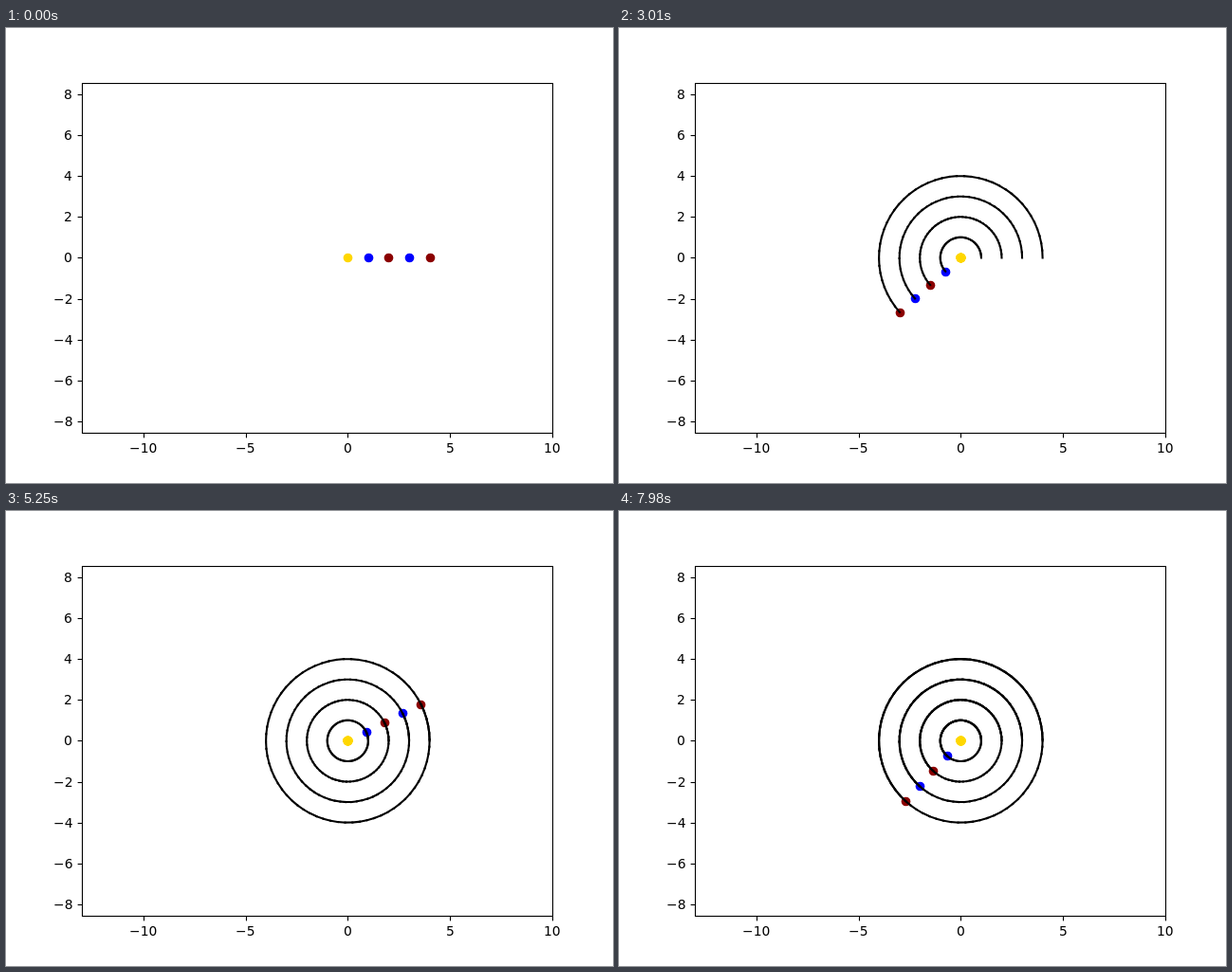
Animation, 640 px wide and 480 px high, one loop 8 s. Source, as an HTML page with a canvas:

```html
<!DOCTYPE html>
<html lang="en">
<head>
<meta charset="utf-8">
<title>Orbits</title>
<style>
html, body { margin: 0; width: 100%; height: 100%; overflow: hidden; background: #fff; }
canvas { display: block; }
</style>
</head>
<body>
<canvas id="stage" width="640" height="480"></canvas>
<script>
const ctx = document.getElementById('stage').getContext('2d');
const LOOP = 8000, STEP_MS = 70, STEP_ANGLE = 0.09;
const UNIT = 496 / 23, CENTER_X = 80 + 13 * UNIT, CENTER_Y = 242.4;
const BODY_RADIUS = 4.86;
const PLANETS = ['blue', 'darkred', 'blue', 'darkred'];

const toX = x => CENTER_X + x * UNIT;
const toY = y => CENTER_Y - y * UNIT;
const snap = v => Math.floor(v + 0.5) + 0.5;
const label = n => String(n).replace('-', '\u2212');

function line(x1, y1, x2, y2) {
  ctx.beginPath();
  ctx.moveTo(x1, y1);
  ctx.lineTo(x2, y2);
  ctx.stroke();
}

function text(str, x, align, baseline) {
  const left = x - ctx.measureText(str).width * align;
  ctx.fillText(str, Math.round(left), baseline);
}

function drawAxes() {
  ctx.strokeStyle = ctx.fillStyle = '#000';
  ctx.lineWidth = 1.11;
  ctx.lineCap = 'butt';
  ctx.font = '13.89px "DejaVu Sans", sans-serif';
  ctx.strokeRect(80.5, 58.5, 496, 369);
  for (let n = -10; n <= 10; n += 5) {
    const x = snap(toX(n));
    line(x, 427.5, x, 432.4);
    text(label(n), toX(n), 0.5, 448);
  }
  for (let n = -8; n <= 8; n += 2) {
    const y = snap(toY(n));
    line(75.6, y, 80.5, y);
    text(label(n), 70.3, 1, Math.round(toY(n) + 5));
  }
}

function drawBody(x, y, color) {
  ctx.fillStyle = color;
  ctx.beginPath();
  ctx.arc(snap(toX(x)), snap(toY(y)), BODY_RADIUS, 0, 2 * Math.PI);
  ctx.fill();
}

function drawOrbit(radius, steps) {
  const point = i => [
    toX(radius * Math.cos(i * STEP_ANGLE)),
    toY(radius * Math.sin(i * STEP_ANGLE))
  ];
  ctx.lineWidth = 2.083;
  ctx.lineCap = 'square';
  for (let i = 0; i < steps; i++) line(...point(i), ...point(i + 1));
}

function draw(step) {
  ctx.clearRect(0, 0, 640, 480);
  drawAxes();
  // The sun is painted once more on every step, which hardens its edge.
  for (let i = 0; i <= step; i++) drawBody(0, 0, 'gold');
  const angle = step * STEP_ANGLE;
  PLANETS.forEach((color, i) => {
    const radius = i + 1;
    drawBody(radius * Math.cos(angle), radius * Math.sin(angle), color);
    drawOrbit(radius, step);
  });
}

function tick() {
  draw(Math.floor(performance.now() % LOOP / STEP_MS));
  requestAnimationFrame(tick);
}
tick();
</script>
</body>
</html>
```
